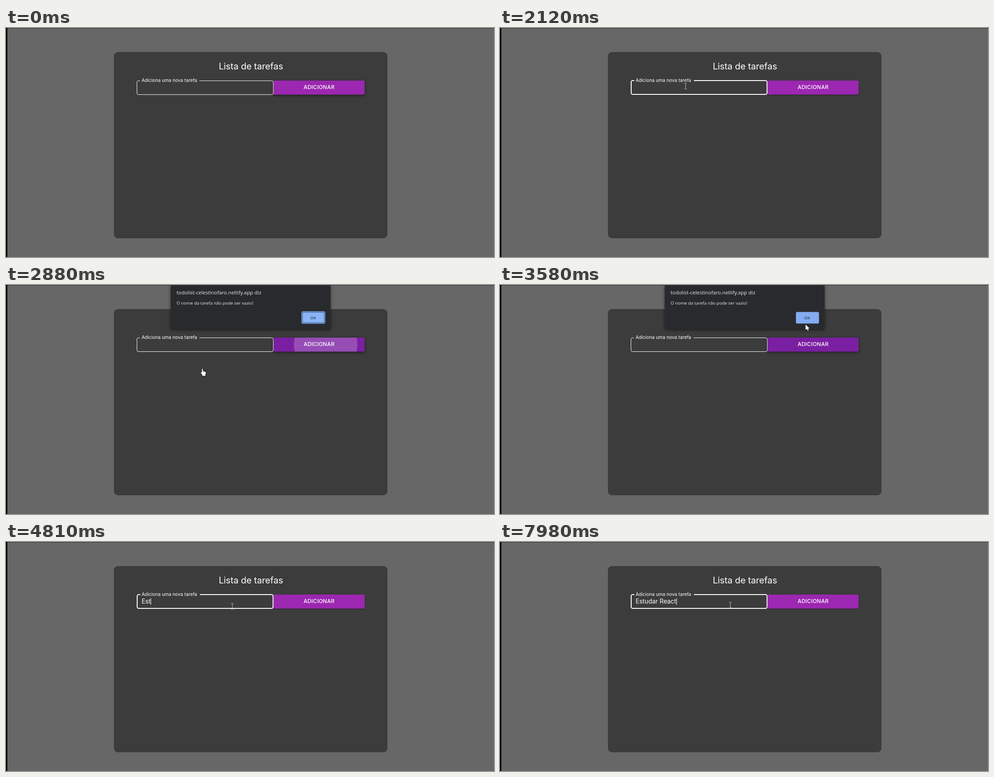
An HTML page with a canvas for the animation above (8000 ms loop, 1090 by 514 pixels).

```html
<!DOCTYPE html>
<html lang="pt">
<head>
<meta charset="utf-8">
<title>Lista de tarefas</title>
<style>
html, body { margin: 0; height: 100%; overflow: hidden; background: #676767; }
canvas { display: block; }
</style>
</head>
<body>
<canvas id="stage" width="1090" height="514"></canvas>
<script>
const ctx = document.getElementById('stage').getContext('2d');
const LOOP = 8000;
const PRESS = 2460, ALERT = 2740, DISMISS = 3510, CLOSED = 3650, REFOCUS = 3860;

// Pointer waypoints: time, x, y
const path = [
  [70, 888, 464], [220, 690, 365], [360, 488, 262], [500, 398, 186], [640, 414, 130],
  [2250, 414, 130], [2390, 684, 172], [2460, 714, 134], [2740, 714, 134], [2880, 438, 187],
  [3020, 334, 250], [3090, 334, 250], [3230, 478, 168], [3370, 517, 76], [3510, 684, 78],
  [3580, 682, 88], [3720, 682, 88], [3790, 620, 112], [3860, 540, 138], [3930, 505, 144],
  [7979, 505, 144], [7980, 514, 141]
];

// Field contents from each time on
const typing = [
  [0, ''], [1190, 'E'], [1720, ''], [4260, 'E'], [4590, 'Es'], [4810, 'Est'],
  [5010, 'Estu'], [5140, 'Estud'], [5270, 'Estuda'], [5400, 'Estudar'], [5600, 'Estudar '],
  [6060, 'Estudar R'], [6460, 'Estudar Re'], [6720, 'Estudar Rec'], [7550, 'Estudar Re'],
  [7650, 'Estudar Rea'], [7850, 'Estudar Reac'], [7980, 'Estudar React']
];

const between = (v, a, b) => v >= a && v < b;

function box(x, y, w, h, r, fill) {
  ctx.beginPath();
  ctx.roundRect(x, y, w, h, r);
  if (fill) { ctx.fillStyle = fill; ctx.fill(); }
}

function shadow(blur, dy, alpha) {
  ctx.shadowColor = `rgba(0,0,0,${alpha})`;
  ctx.shadowBlur = blur;
  ctx.shadowOffsetY = dy;
}

function text(str, x, y, font, color, align = 'left', spacing = 0) {
  ctx.font = font;
  ctx.fillStyle = color;
  ctx.textAlign = align;
  ctx.letterSpacing = spacing + 'px';
  ctx.fillText(str, x, y);
}

function pointerAt(t) {
  if (t < path[0][0]) return null;
  if (t < 4000) t = Math.max(70, Math.floor((t - 10) / 70) * 70 + 10);
  const i = path.findIndex(p => p[0] > t);
  if (i < 0) return path[path.length - 1].slice(1);
  const [t0, x0, y0] = path[i - 1], [t1, x1, y1] = path[i];
  const k = (t - t0) / (t1 - t0);
  return [x0 + (x1 - x0) * k, y0 + (y1 - y0) * k];
}

function drawField(t, focused) {
  const [x, y, w, h] = focused ? [293, 118, 303.5, 31] : [292.5, 118.5, 304.5, 31];
  ctx.save();
  ctx.beginPath();
  ctx.rect(280, 105, 330, 55);
  ctx.rect(focused ? 300 : 299, 112, 133, 12);
  ctx.clip('evenodd');
  box(x, y, w, h, 3.5);
  ctx.strokeStyle = '#fff';
  ctx.lineWidth = focused ? 2 : 1;
  ctx.stroke();
  ctx.restore();
  text('Adiciona uma nova tarefa', 303, 121, '10.3px Inter, sans-serif', '#fff');

  const value = typing.findLast(e => e[0] <= t)[1];
  text(value, 303, 138, '13.8px Inter, sans-serif', '#fff');
  const caretOn = focused && !between(t, 1720, REFOCUS) && !between(t, 7250, 7450);
  if (caretOn) {
    ctx.fillRect(Math.round(303 + ctx.measureText(value).width), 126, 1, 15);
  }
}

function drawButton(t, hover, focused) {
  ctx.save();
  if (focused) shadow(2, 1, .45); else shadow(6, 2, .5);
  box(597.5, 118, 203.5, 31.5, 3, hover ? '#7b1fa2' : '#9c27b0');
  ctx.restore();
  if (between(t, PRESS, DISMISS)) {
    const k = (Math.min(t, ALERT) - PRESS) / 550;
    const ease = k * k * (3 - 2 * k);
    ctx.save();
    box(597.5, 118, 203.5, 31.5, 3);
    ctx.clip();
    ctx.beginPath();
    ctx.arc(714, 134, 138 * ease, 0, 7);
    ctx.fillStyle = `rgba(255,255,255,${.1 + .2 * ease})`;
    ctx.fill();
    ctx.restore();
  }
  text('ADICIONAR', 699.3, 137, '500 12px Inter, sans-serif', '#fff', 'center', .25);
}

function drawAlert(t) {
  ctx.save();
  shadow(7, 2, .55);
  box(368, 0, 357, 99, [0, 0, 4, 4], '#292a2d');
  ctx.restore();
  const face = '"Open Sans", sans-serif';
  text('todolist-celestinofaro.netlify.app diz', 381, 21, '11.4px ' + face, '#e8eaed');
  text('O nome da tarefa não pode ser vazio!', 381, 44, '9.82px ' + face, '#e8eaed');
  if (t < DISMISS) {
    box(660, 59, 53, 28, 4, '#8ab4f8');
    box(661.5, 60.5, 50, 25, 3, '#24344f');
    box(662.5, 61.5, 48, 23, 2, '#8ab4f8');
  } else {
    box(661, 60.5, 51.5, 26, 3, '#84acf0');
  }
  text('OK', 686, 76.5, '600 9px ' + face, '#34435e', 'center');
}

const shapes = {
  arrow: new Path2D('M0 0V12.5L3 9.8L5 14.5L7 13.6L5.1 9.2H9Z'),
  hand: new Path2D('M-1 1Q0-.6 1.2 1V6L3 6.3L5 7L7 7.8Q8.3 8.3 8 10L6.8 14V16.5H0V14.4L-3.6 9.8Q-3.8 8-2 8.6L-1 9.7Z'),
  beam: new Path2D('M-3-6.5H-1L0-5.5L1-6.5H3M0-5.5V5.5M-3 6.5H-1L0 5.5L1 6.5H3')
};

function drawPointer(kind, x, y) {
  ctx.save();
  ctx.translate(Math.round(x) + .5, Math.round(y) + .5);
  ctx.lineWidth = 1;
  if (kind === 'beam') {
    ctx.strokeStyle = '#c4c4c4';
    ctx.stroke(shapes.beam);
  } else {
    ctx.lineWidth = 1.6;
    ctx.strokeStyle = '#111';
    ctx.stroke(shapes[kind]);
    ctx.fillStyle = '#fff';
    ctx.fill(shapes[kind]);
  }
  ctx.restore();
}

function draw(t) {
  const focused = between(t, 640, PRESS) || t >= REFOCUS;
  const alertOpen = between(t, ALERT, CLOSED);
  const pointer = pointerAt(t);

  ctx.fillStyle = '#676767';
  ctx.fillRect(0, 0, 1090, 514);
  box(241, 54, 611, 418, 9, '#3c3c3c');
  text('Lista de tarefas', 547, 92.5, '20px Inter, sans-serif', '#fff', 'center', -.1);
  drawButton(t, between(t, PRESS, 3790), focused);
  drawField(t, focused);
  if (alertOpen) drawAlert(t);
  ctx.fillStyle = '#333';
  ctx.fillRect(0, 0, 1090, 1);
  ctx.fillStyle = '#000';
  ctx.fillRect(0, 0, 3, 514);

  if (!pointer) return;
  const [x, y] = pointer;
  const inRow = between(y, 118, 150);
  let kind = 'arrow';
  if (alertOpen) {
    if (y > 99) kind = 'hand'; // the blocked page keeps its last pointer
  } else if (inRow && between(x, 292, 597)) kind = 'beam';
  else if (inRow && between(x, 597, 801)) kind = 'hand';
  drawPointer(kind, x, y);
}

const start = performance.now();
function tick() {
  draw((performance.now() - start) % LOOP);
  requestAnimationFrame(tick);
}
tick();
</script>
</body>
</html>
```
